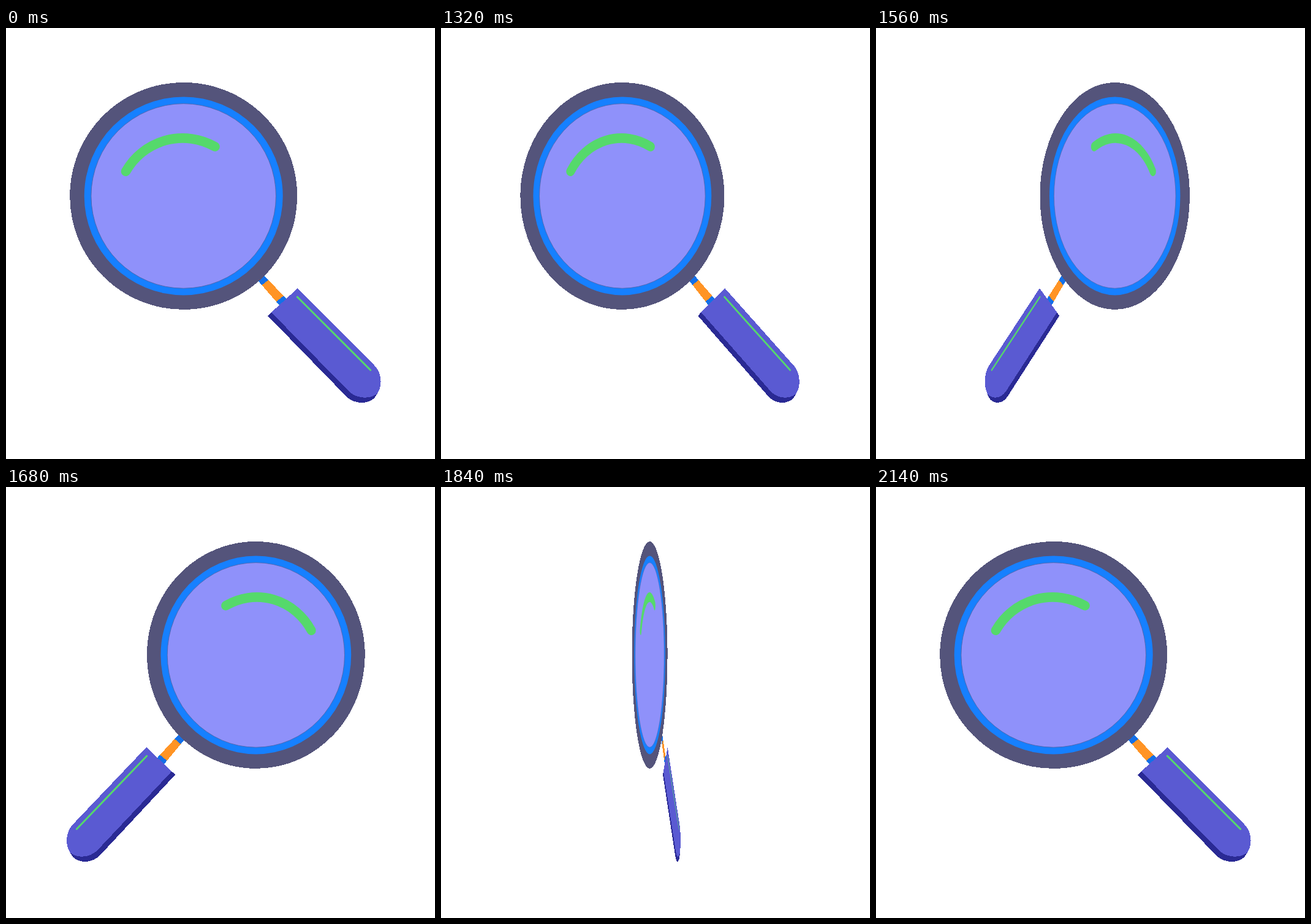
These frames come from a looping animation (700 by 704 pixels, 2.98 s). An HTML page:

```html
<!DOCTYPE html>
<html lang="en">
<head>
<meta charset="utf-8">
<title>Turning magnifier</title>
<style>
  html, body { margin: 0; height: 100%; overflow: hidden; background: #fff; }
  svg { display: block; width: 700px; height: 704px; }
  .hard { shape-rendering: crispEdges; }
</style>
</head>
<body>
<svg viewBox="0 0 700 704">
  <g id="glass">
    <!-- neck -->
    <g class="hard">
      <path fill="#1470e8" d="M410 411.4L419 402.1L460 444.8L448 455Z"/>
      <path fill="#ff9425" d="M417.5 420L428 411.5L453 437.5L441 447Z"/>
    </g>
    <!-- lens -->
    <g transform="translate(289.7 274.4)">
      <circle class="hard" r="185.5" fill="#54547b"/>
      <circle r="162" fill="#1680ff"/>
      <circle r="150.8" fill="#8f91fa" stroke="#4f5fa0" stroke-width=".8"/>
    </g>
    <path fill="none" stroke="#55d96b" stroke-width="15.6" stroke-linecap="round"
      d="M195.5 234.3A106.5 106.5 0 0 1 341 193.8"/>
    <!-- handle -->
    <g class="hard">
      <path fill="#2a2a94" d="M440 458L427 470L554 600.5C566 614 588 616 601 604.5L606 597L590 580Z"/>
      <path fill="#5a5ad2" d="M476 425L602 552C614 565 614 585 606 597C594 607 572 606 559 593L433 464.5Z"/>
    </g>
    <path stroke="#55d96b" stroke-width="3" stroke-linecap="round" d="M475.3 439.3L594.7 558.7"/>
  </g>
</svg>
<script>
  const LOOP = 2980, STEP = 20, START = 1157.5, SPIN = 985, AXIS = 350;
  const glass = document.getElementById('glass');
  const origin = performance.now();
  const smooth = u => u * u * (3 - 2 * u);

  // One full, eased turn about the vertical axis.
  function draw() {
    const elapsed = (performance.now() - origin) % LOOP;
    const time = Math.floor(elapsed / STEP) * STEP;
    const u = Math.min(1, Math.max(0, (time - START) / SPIN));
    const scale = Math.cos(2 * Math.PI * smooth(u));
    glass.setAttribute('transform', `translate(${AXIS * (1 - scale)} 0) scale(${scale} 1)`);
    requestAnimationFrame(draw);
  }
  draw();
</script>
</body>
</html>
```
